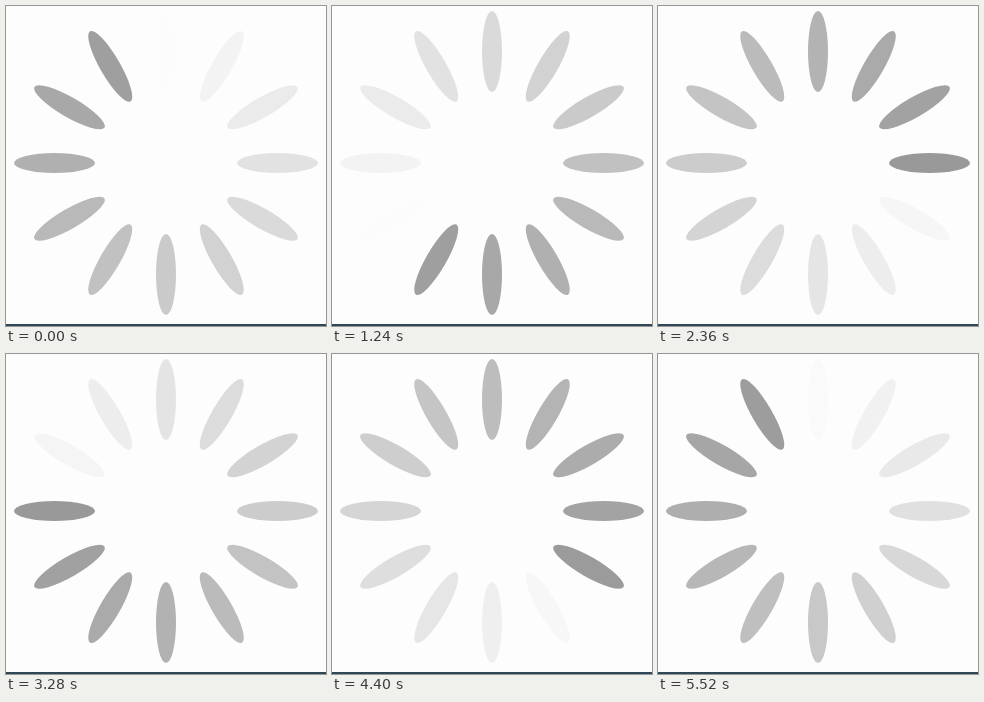
These frames come from a looping animation (320x320 px, 5.56 s). An HTML page:

```html
<!DOCTYPE html>
<html lang="en">
<head>
<meta charset="utf-8">
<title>Loading spinner</title>
<style>
  html, body { margin: 0; width: 100%; height: 100%; overflow: hidden; background: #fdfdfd; }
  svg { display: block; width: 100vw; height: 100vh; }
</style>
</head>
<body>
<svg viewBox="0 0 320 320">
  <g id="petals"></g>
  <rect y="318" width="320" height="2" fill="#2f4858"/>
</svg>
<script>
const LOOP = 5560, TICK = 40, COUNT = 12, TURNS = 3;
const START = 11.85; // position of the darkest petal at time zero

const petals = Array.from({ length: COUNT }, (_, i) => {
  const petal = document.createElementNS("http://www.w3.org/2000/svg", "ellipse");
  const attrs = { cx: 160, cy: 45.5, rx: 10, ry: 40.5, transform: `rotate(${i * 360 / COUNT} 160 157)` };
  for (const name in attrs) petal.setAttribute(name, attrs[name]);
  return document.getElementById("petals").appendChild(petal);
});

function draw(time) {
  const t = Math.floor((time % LOOP) / TICK) * TICK;
  const head = START + TURNS * COUNT * t / LOOP;
  petals.forEach((petal, i) => {
    const age = (head - i) % COUNT / COUNT;
    petal.setAttribute("fill-opacity", 0.4 * (1 - age));
  });
}

const begin = performance.now();
function frame() {
  draw(performance.now() - begin);
  requestAnimationFrame(frame);
}
frame();
</script>
</body>
</html>
```
